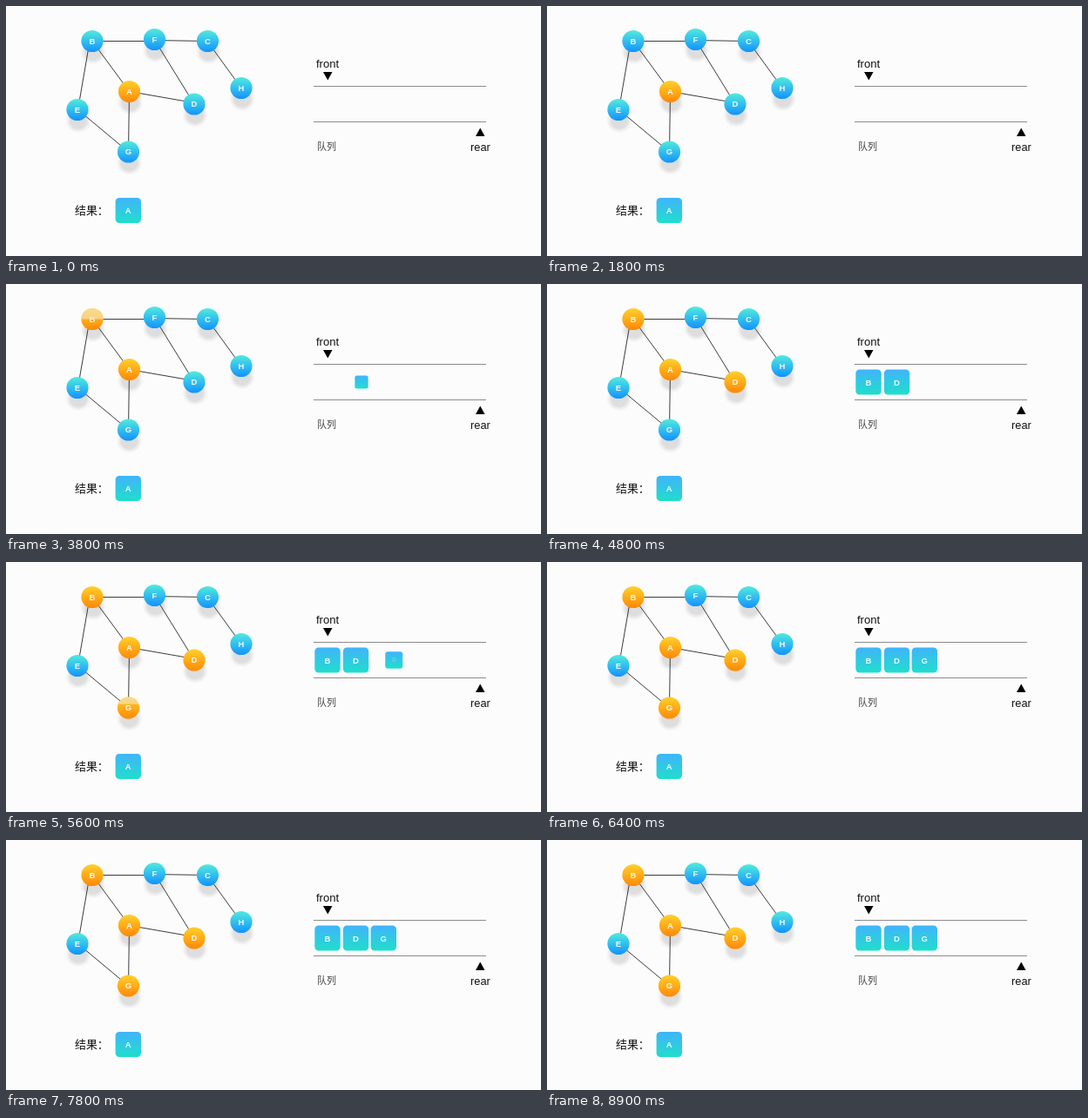
These frames come from a looping animation (614x288 px, 9000 ms). An HTML page:

```html
<!DOCTYPE html>
<html lang="zh-CN">
<head>
<meta charset="utf-8">
<title>图的遍历与队列</title>
<style>
  html, body { margin: 0; width: 100%; height: 100%; overflow: hidden; background: #fcfcfc; }
  svg { display: block; }
  text { font-family: "Liberation Sans", Arial, sans-serif; }
  .cjk { font-family: "Noto Sans CJK SC", "Noto Sans CJK", sans-serif; }
  .letter { font-size: 9.5px; font-weight: bold; fill: #fff; fill-opacity: .9; text-anchor: middle; }
</style>
</head>
<body>
<svg width="614" height="288" viewBox="0 0 614 288">
  <defs>
    <linearGradient id="blue" x2="0" y2="1">
      <stop stop-color="#52ebdc"/><stop offset="1" stop-color="#1292ff"/>
    </linearGradient>
    <linearGradient id="orange" x2="0" y2="1">
      <stop stop-color="#ffd02c"/><stop offset="1" stop-color="#ff8805"/>
    </linearGradient>
    <linearGradient id="tile" x2="0" y2="1">
      <stop stop-color="#40b4fb"/><stop offset="1" stop-color="#20decb"/>
    </linearGradient>
    <radialGradient id="shadow">
      <stop offset=".6" stop-color="#dedede"/>
      <stop offset="1" stop-color="#e6e6e6" stop-opacity="0"/>
    </radialGradient>
  </defs>
  <g id="shadows"></g>
  <path d="M99 40.5H170M170 39.5L231 40.5L270 94.5M99 40.5L141.5 98.5L216 111.5M96 41L82.5 119.5L140.5 168M141.5 98.5L140.5 168M170.5 39L216 113"
    fill="none" stroke="#3c3c3c"/>
  <g id="nodes"></g>
  <path d="M353 92.5H551M353 133.5H551" stroke="#8c8c8c"/>
  <path d="M364 76h10.5l-5.25 9.5zM539 150h10.5l-5.25-9.5z"/>
  <text x="356" y="70.5" font-size="13" fill="#111">front</text>
  <text x="533" y="167" font-size="12.8" fill="#111">rear</text>
  <text class="cjk" x="357" y="166" font-size="11" fill="#444">队列</text>
  <text class="cjk" x="79" y="239.5" font-size="12.9" fill="#111">结果：</text>
  <g id="tiles"></g>
</svg>
<script>
const LOOP = 9000, STEP = 100, FLIGHT = 600, QUEUE_Y = 113, RADIUS = 12.6;
const nodes = {
  A: [141.5, 98.5], B: [99, 40.5], C: [231.5, 40.5], D: [216, 113],
  E: [82, 119.5], F: [170.5, 38.5], G: [140.5, 168], H: [270, 94.5]
};
const visits = [
  { name: "B", start: 3500, from: 525, to: 369 },
  { name: "D", start: 4200, from: 529, to: 401.5 },
  { name: "G", start: 5200, from: 541, to: 433.3 }
];

function add(parent, tag, attrs, text = "") {
  const el = document.createElementNS("http://www.w3.org/2000/svg", tag);
  for (const key in attrs) el.setAttribute(key, attrs[key]);
  el.textContent = text;
  return parent.appendChild(el);
}
const layer = id => document.getElementById(id);

function addDisc(x, y, color, name) {
  const group = add(layer("nodes"), "g", { transform: `translate(${x} ${y})` });
  add(group, "circle", { r: RADIUS, fill: `url(#${color})` });
  add(group, "text", { class: "letter", y: 3.4 }, name);
  return group;
}

function addTile(name, x, y) {
  const group = add(layer("tiles"), "g", { transform: `translate(${x} ${y})` });
  add(group, "rect", { x: -14.7, y: -14.5, width: 29.4, height: 29, rx: 4.5, fill: "url(#tile)" });
  const letter = add(group, "text", { class: "letter", y: 3.5 }, name);
  return { group, letter };
}

// Upper part of a disc, covering the given share of its height.
function capPath(share) {
  const y = RADIUS * (2 * share - 1);
  const w = Math.sqrt(Math.max(0, RADIUS ** 2 - y ** 2));
  return `M${-w} ${y}A${RADIUS} ${RADIUS} 0 ${y > 0 ? 1 : 0} 1 ${w} ${y}Z`;
}

for (const name in nodes) {
  const [x, y] = nodes[name];
  add(layer("shadows"), "ellipse", { cx: x + 1, cy: y + 13, rx: 15, ry: 14, fill: "url(#shadow)" });
  const disc = addDisc(x, y, name === "A" ? "orange" : "blue", name);
  const visit = visits.find(v => v.name === name);
  if (visit) {
    visit.blue = disc;
    visit.orange = addDisc(x, y, "orange", name);
    visit.haze = add(visit.orange, "path", { fill: "#f6dfb4", "fill-opacity": 0.7 });
    visit.tile = addTile(name, visit.to, QUEUE_Y);
  }
}
addTile("A", 140.3, 235.5);

function render(time) {
  for (const { start, from, to, blue, orange, haze, tile } of visits) {
    const p = Math.min(1, Math.max(0, (time - start) / FLIGHT));
    const x = to + (from - to) * (1 - p) ** 2;
    const scale = 0.04 + 0.96 * p;
    tile.group.setAttribute("visibility", time < start ? "hidden" : "visible");
    tile.group.setAttribute("transform", `translate(${x} ${QUEUE_Y}) scale(${scale})`);
    tile.letter.setAttribute("opacity", Math.max(0, (p - 0.55) / 0.45));
    blue.setAttribute("opacity", p < 0.5 ? 1 : 0);
    orange.setAttribute("opacity", Math.min(1, 2 * p));
    haze.setAttribute("d", capPath(1 - p));
  }
}

const begin = performance.now();
function tick() {
  const time = (performance.now() - begin) % LOOP;
  render(Math.floor(time / STEP) * STEP);
  requestAnimationFrame(tick);
}
tick();
</script>
</body>
</html>
```
